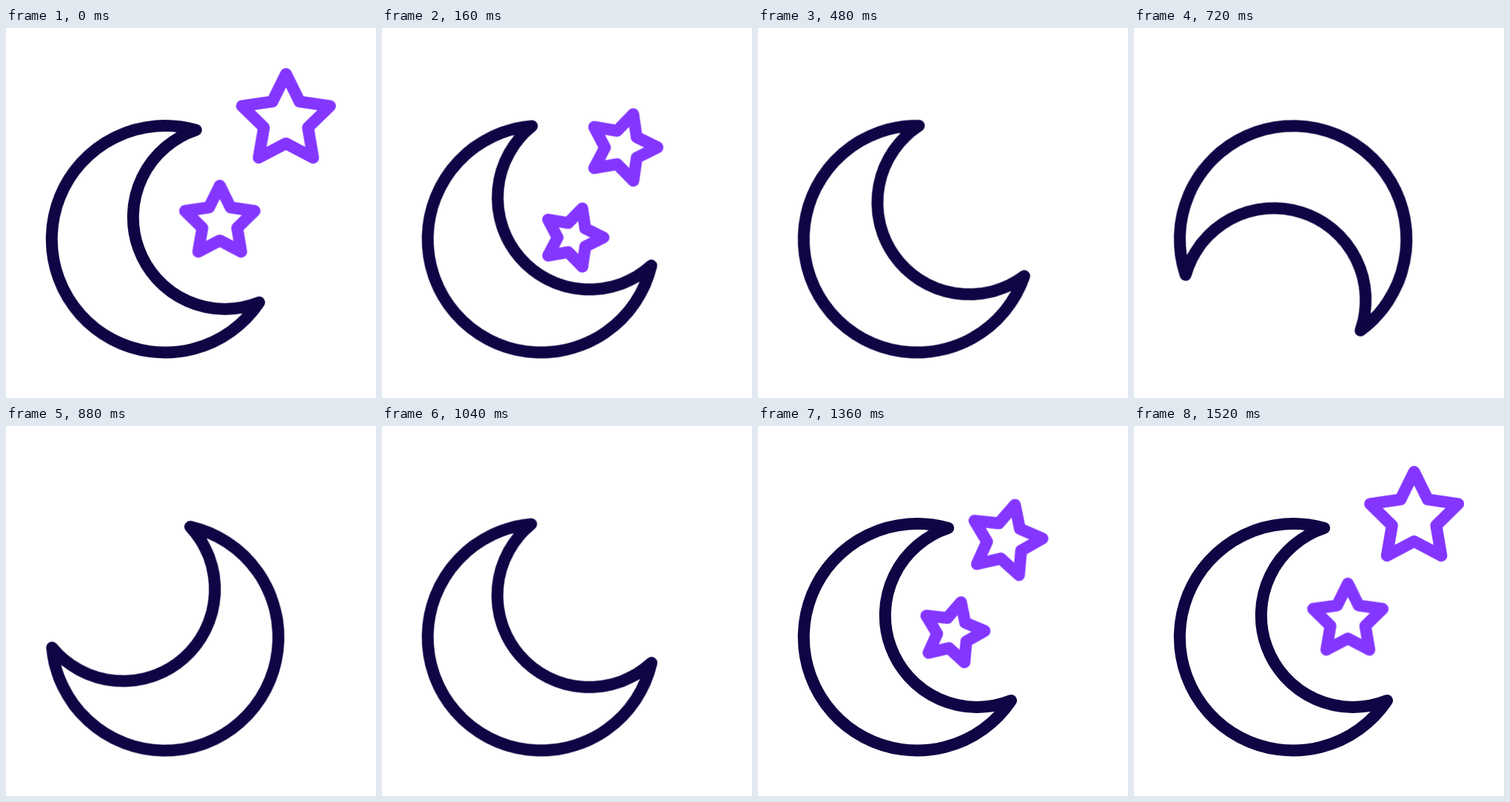
Write an HTML page without scripts that moves like this. It is 500x500 px and loops after 2 s.

```html
<!DOCTYPE html>
<html lang="en">
<head>
<meta charset="utf-8">
<title>Moon and stars</title>
<style>
  html, body { margin: 0; width: 100%; height: 100%; overflow: hidden; background: #fff; }
  svg { display: block; width: 500px; height: 500px; }

  .moon, .star, .star-shape {
    stroke-width: 16;
    stroke-linejoin: round;
    stroke-linecap: round;
  }
  .moon {
    fill: #fff;
    stroke: #0f0544;
    transform-origin: 215px 285.4px;
    animation: spin 2s -8ms infinite cubic-bezier(.333, 0, .667, 1);
  }
  .star-shape { vector-effect: non-scaling-stroke; }
  .star {
    fill: none;
    stroke: #8436ff;
    animation:
      dive 2s -8ms infinite cubic-bezier(.333, 0, .667, 1),
      hide 2s -8ms infinite step-end;
  }
  .big   { --from: 378.5px, 124.6px; --size: .626; --to: 163px, 273px; --end: .01; }
  .small { --from: 289px, 262.4px;   --size: .494; --to: 164px, 346px; --end: .17; }

  /* Wind up backwards, then one full turn */
  @keyframes spin {
    0% { transform: rotate(0deg); }
    13.5%, 20% { transform: rotate(-30deg); }
    57.75%, 100% { transform: rotate(360deg); }
  }
  /* Stars sink behind the moon and come back */
  @keyframes dive {
    0%, 76%, 100% { transform: translate(var(--from)) rotate(0deg) scale(var(--size)); }
    26%, 50% { transform: translate(var(--to)) rotate(72deg) scale(var(--end)); }
  }
  @keyframes hide {
    0%, 53.5% { opacity: 1; }
    23% { opacity: 0; }
  }
</style>
</head>
<body>
<svg>
  <defs>
    <polygon id="star" class="star-shape" points="0,-100 29.4,-40.5 95.1,-30.9 47.6,15.5 58.8,80.9 0,50 -58.8,80.9 -47.6,15.5 -95.1,-30.9 -29.4,-40.5"/>
  </defs>
  <use class="star big" href="#star"/>
  <use class="star small" href="#star"/>
  <path class="moon" d="M257 138A153.2 153.2 0 1 0 342 371A124.07 124.07 0 1 1 257 138Z"/>
</svg>
</body>
</html>
```
